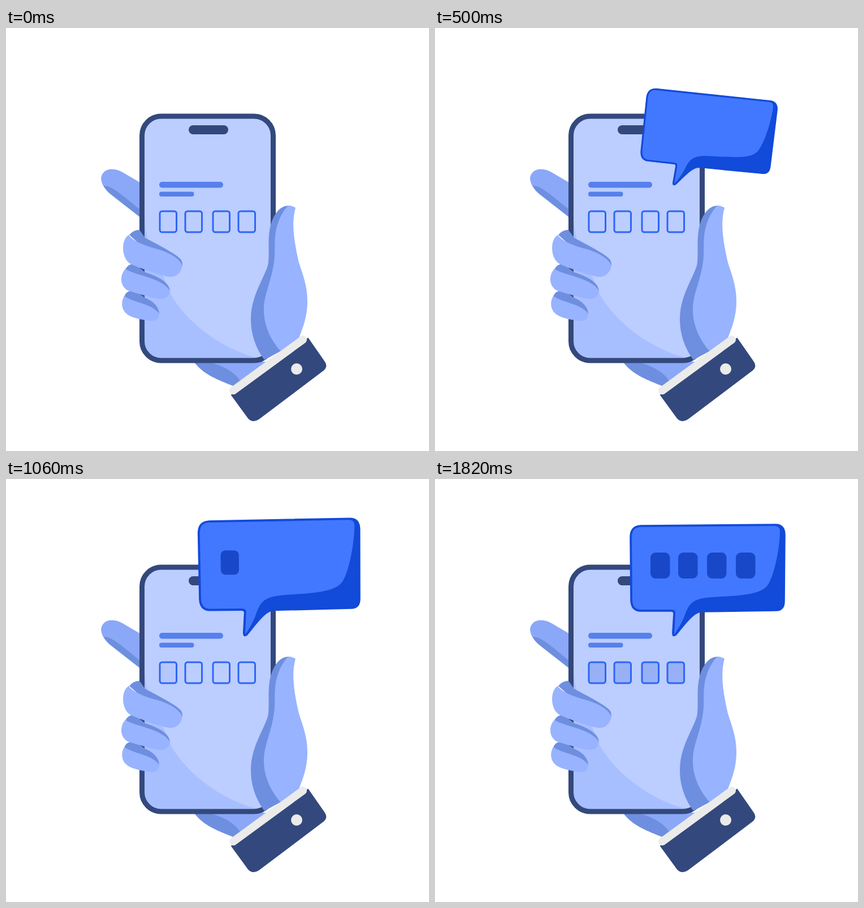
An HTML page that plays this animation: 748 px wide and 748 px high, repeating every 3600 ms.

```html
<!DOCTYPE html>
<html lang="en">
<head>
<meta charset="utf-8">
<title>One-time code</title>
<style>
  html, body { margin: 0; width: 100%; height: 100%; overflow: hidden; background: #fff; }
  svg { display: block; width: 100%; height: 100%; }
  .navy { fill: #33487c; }
  .skin { fill: #98b3ff; }
  .back { fill: #8aa8f7; }
  .shade { fill: #6e8fe0; }
  .line { fill: #5680eb; }
</style>
</head>
<body>
<svg viewBox="0 0 748 748">
  <!-- parts of the hand behind the phone -->
  <path class="shade" d="M171 277C185 272 215 285 240 315V337L185 294Q176 287 171 277Z"/>
  <path class="back" d="M240 275L206 255C190 246 169 248 168 267Q169 274 172 279C188 277 212 302 240 323Z"/>
  <path class="shade" d="M332 590H385C400 598 412 612 418 625L404 634C375 622 350 614 332 590Z"/>
  <path class="back" d="M358 590H460L474 580L416 627C406 609 388 599 358 590Z"/>

  <rect x="240.5" y="156" width="232" height="432" rx="34" fill="#bccdff"/>
  <path fill="#a8bfff" d="M245 342C250 395 275 425 289 466C312 512 372 565 446 584H275Q245 584 245 554Z"/>
  <rect x="240.5" y="156" width="232" height="432" rx="34" fill="none" stroke="#33487c" stroke-width="9"/>
  <rect class="navy" x="323" y="172" width="70" height="16" rx="8"/>
  <rect class="line" x="271" y="272" width="113" height="10.5" rx="5"/>
  <rect class="line" x="271" y="289.5" width="61.5" height="8.5" rx="4"/>
  <g id="slots" fill="#98b1f6" stroke="#2d66f6" stroke-width="3"></g>

  <!-- fingers -->
  <path class="shade" d="M209 475Q212 466 220 465L236 470L246 477C258 482 270 491 271 505L240 503Z"/>
  <path class="skin" d="M209 474C226 486 257 487 271 505C271 515 264 519 255 518C240 516 226 513 217 508C203 500 203 484 209 474Z"/>
  <path class="shade" d="M211 427Q216 417 226 417L236 424L246 432C262 437 288 447 290 464L255 462Z"/>
  <path class="skin" d="M211 426C229 438 272 440 290 464C290 475 281 480 270 479C250 475 231 469 215 464C201 456 201 437 211 426Z"/>
  <path class="shade" d="M218 366Q225 357 236 357L246 371C270 384 300 399 309 409Q312 413 312 420L270 412Z"/>
  <path class="skin" d="M217 366C226 379 250 386 268 391C291 398 307 408 312 420C309 436 298 441 288 440C268 436 241 426 222 418C203 409 203 374 217 366Z"/>

  <!-- thumb and palm -->
  <path class="shade" d="M505 315C490 311 477 322 469 345C461 370 467 400 463 420C455 445 433 475 433 515C433 545 444 569 457 587L490 569Z"/>
  <path class="skin" d="M512 318C505 342 508 372 518 415C524 434 533 455 533 483C533 510 525 530 518 548L486 572C464 547 455 520 456 495C457 470 468 450 473 420C478 395 472 372 480 348C485 332 491 323 499 314Q507 314 512 318Z"/>

  <!-- cuff -->
  <path class="navy" stroke="#33487c" stroke-width="2" d="M399 649L534 549L562 589Q569 598 561 605L447 691Q437 698 429 690Z"/>
  <path d="M402 641L525 551" stroke="#ebebeb" stroke-width="14" stroke-linecap="round"/>
  <circle cx="514" cy="603" r="10" fill="#ebebeb"/>

  <g id="bubble">
    <path fill="#124ad9" stroke="#124ad9" stroke-width="1.5" d="M364 82L602 80Q619 80 619 99L618 216Q618 233 603 233L470 235C455 237 440 260 426 276Q419 281 420 270L422 238Q422 234 417 234H362Q347 233 346 215L345 103Q345 83 364 82Z"/>
    <path fill="#4278ff" d="M364 85L601 83Q610 83 610 93C609 130 598 175 588 188C575 205 540 206 490 209C458 211 450 218 442 240C437 254 430 265 423 275L425 237Q425 231 418 231H364Q350 231 349 215L348 103Q348 85 364 85Z"/>
    <g id="digits" fill="#1848c8"></g>
  </g>
</svg>
<script>
const LOOP = 3600, SHOW = 220, GROW = 540, SETTLE = 520;
const PEAK = 1.115, PEAK_TURN = -1.6;
const DIGIT_START = 900, STEP = 200;
const digitX = [381, 430, 481, 532], slotX = [272, 317, 366, 411];
const $ = id => document.getElementById(id);
const bubble = $('bubble');

const clamp = v => Math.max(0, Math.min(1, v));
const mix = (a, b, p) => a + (b - a) * p;
const smooth = v => { const u = clamp(v); return u * u * (3 - 2 * u); };
const easeOut = (u, n) => (n * u - u ** n) / (n - 1);

function addRect(parent, x, y, width, height, rx) {
  const rect = document.createElementNS('http://www.w3.org/2000/svg', 'rect');
  for (const [key, value] of Object.entries({ x, y, width, height, rx })) rect.setAttribute(key, value);
  return parent.appendChild(rect);
}
const digits = digitX.map(x => addRect($('digits'), x, 130, 34.5, 46, 9));
const slots = slotX.map(x => addRect($('slots'), x, 324, 29.5, 37, 4));

function drawBubble(t) {
  const u = clamp((t - SHOW) / GROW);
  const back = smooth((t - SHOW - GROW) / SETTLE);
  const scale = mix(mix(0.263, PEAK, easeOut(u, 3.5)), 1, back);
  const turn = mix(mix(18.8, PEAK_TURN, easeOut(u, 7)), 0, back);
  bubble.setAttribute('opacity', clamp((t - SHOW) / 130));
  bubble.setAttribute('transform',
    `translate(422 278) rotate(${turn}) scale(${scale}) translate(-422 -278)`);
}

function drawDigit(i, t) {
  const start = DIGIT_START + i * STEP;
  const p = smooth((t - start) / STEP);
  // The first digit pops up; each later one slides out of its neighbour.
  digits[i].setAttribute('transform', i
    ? `translate(${(digitX[i - 1] - digitX[i]) * (1 - p)} 0)`
    : `translate(398 153) scale(${p}) translate(-398 -153)`);
  digits[i].setAttribute('visibility', t > start ? 'visible' : 'hidden');
  slots[i].setAttribute('fill-opacity', smooth((t - start - STEP / 2) / STEP));
}

function draw(now) {
  const t = now % LOOP;
  drawBubble(t);
  digits.forEach((_, i) => drawDigit(i, t));
}

let begin;
function tick(now) {
  begin ??= now;
  draw(now - begin);
  requestAnimationFrame(tick);
}
draw(0);
requestAnimationFrame(tick);
</script>
</body>
</html>
```
